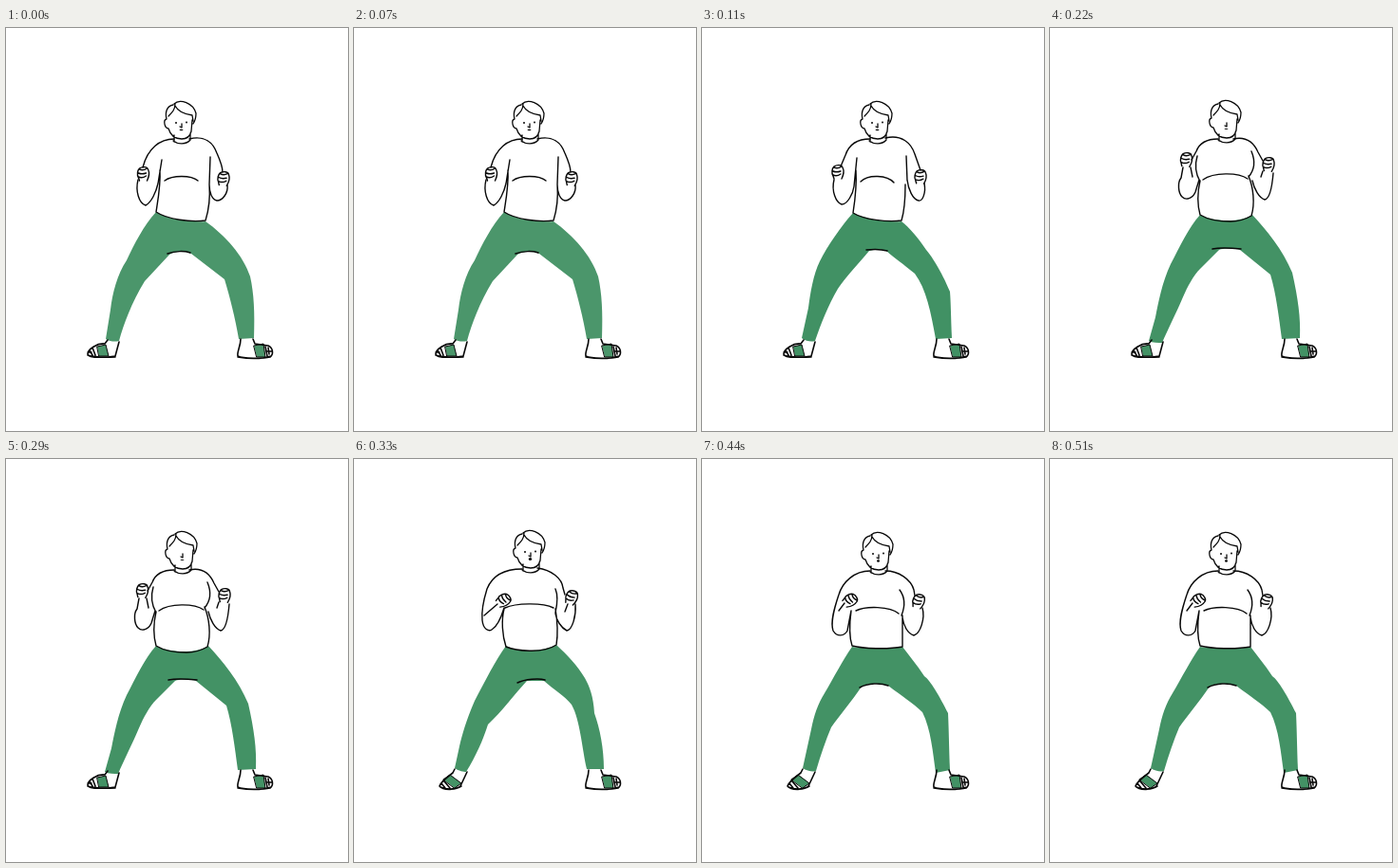
Animation, 360 px wide and 425 px high, one loop 0.55 s. Source, as an HTML page with a canvas:

```html
<!DOCTYPE html>
<html lang="en">
<head>
<meta charset="utf-8">
<title>Dance</title>
<style>
  html, body { margin: 0; width: 100%; height: 100%; overflow: hidden; background: #fff; }
  canvas { display: block; width: 360px; height: 425px; }
</style>
</head>
<body>
<canvas id="stage" width="360" height="425"></canvas>
<script>
const ctx = document.getElementById('stage').getContext('2d');
const STEP = 110, INK = '#080808';

const HEAD = `M169 96C167 88 170 82 176 81M177 80C183 74 197 79 200 90C200 95 199 98 197 101
  M178 80C178 86 175 89 171 93M178 82C181 88 189 91 196 92L197 98
  M169 96C165 97 167 106 171 106C173 113 178 117 185 117C191 117 194 113 195 109L196 97
  M177 113V120M194 111V117M176 119C181 123 190 123 194 118M185 101V105L183 104`;

const FIST = `M-4 7L-5 4C-7 1-6-4-4-6C-1-8 4-8 5-5C7-1 6 3 4 7
  M-4-5C-2-4 1-4 4-6M-5-1C-3 0 0 0 3-1M-5 3C-3 4 0 4 3 2`;

// Each foot: ink outline, then the green strap.
const FLAT_FOOT = {
  ink: `M107 329L104 333C96 332 86 339 86 344C87 349 109 347 115 346L119 331
    M86 345C95 348 106 347 115 347M88 340L91 345M91 337L94 345M86 342L90 342`,
  strap: 'M96 336L105 334L108 346L98 346Z'
};
const TURNED_FOOT = {
  ink: `M106 327L104 331C100 334 91 341 90 345C94 350 108 349 112 345L119 330
    M91 346C97 349 107 349 113 345M92 342L96 347M95 340L101 347`,
  strap: 'M94 338L101 333L113 342L106 347Z'
};
const RIGHT_FOOT = {
  ink: `M247 328C247 336 243 341 244 346C250 349 270 349 278 347C282 344 281 337 276 335L262 333L260 328
    M244 347C256 349 270 349 279 346M273 336L275 346M276 337L277 344M275 341L280 341`,
  strap: 'M261 335L271 333L273 347L264 347Z'
};

// head: offset; fists: x, y, angle; mouth: half width, half height
const POSES = [
  {
    green: '#4b966b', head: [0, 0], mouth: [2, .7], foot: FLAT_FOOT,
    fists: [[144.5, 154, 0], [229, 159, .1]],
    pants: `M158 194C145 208 135 228 127 245C117 260 112 280 110 297L105 328C110 331 115 331 119 330
      C124 312 132 290 146 267L172 239C178 235 188 235 195 238L230 265C236 285 241 305 245 328L261 327
      C262 300 261 280 257 262C250 240 230 218 210 204C195 205 170 202 158 194`,
    body: `M177 117C162 117 149 127 144 147M139 160C136 172 140 185 147 187C153 184 158 173 160 164L164 139
      M162 150C163 165 160 181 158 194C170 202 195 205 210 203C214 190 215 178 214 165L215 136
      M193 117C209 113 218 121 222 132C226 141 228 147 228 152
      M233 166C234 174 228 182 222 182C217 181 214 174 214 165M167 161C175 155 195 155 202 161`,
    crotch: 'M170 238C178 235 188 235 194 237'
  },
  {
    green: '#419164', head: [0, 0], mouth: [2, .7], foot: FLAT_FOOT,
    fists: [[143, 152, 0], [230, 157, .05]],
    pants: `M159 195C147 208 132 230 124 246C117 260 114 280 112 295L105 327C110 331 116 331 119 330
      C125 312 133 292 143 275C152 262 165 248 176 235C182 233 188 233 194 235C203 243 212 249 224 259
      C236 275 241 300 246 328L263 327C262 305 262 290 261 278C252 256 240 238 236 234
      C228 222 218 210 210 204C195 205 172 202 159 195`,
    body: `M177 117C165 117 155 122 151 134L146 146M139 160C136 172 141 184 147 186C153 186 159 175 160 167L163 137
      M162 150C163 165 161 182 159 195C170 202 195 205 210 203C213 193 214 180 214 165M215 135L216 161
      M193 116C210 112 220 121 224 133L230 150M234 164C236 174 232 183 228 182C222 181 217 170 216 160
      M167 162C175 154 195 155 202 163`,
    crotch: 'M173 234C181 233 188 233 195 235'
  },
  {
    green: '#439265', head: [1, -1], mouth: [2, .6], foot: FLAT_FOOT, calm: true,
    fists: [[143.5, 139, .1], [230, 144, .1]],
    pants: `M158 197C146 210 136 232 127 249C118 268 114 290 111 305L104 330C108 332 114 332 118 332
      C124 318 133 300 139 286C145 272 151 261 158 254L178 234C182 232 195 232 200 234L232 260
      C238 280 241 305 244 328L263 327C264 305 261 285 255 258C245 234 228 213 213 197
      C200 206 170 204 158 197`,
    body: `M177 117C165 117 157 122 154 130L149 139M155 135C152 145 154 155 158 162
      M140 147L138 158C134 163 135 174 139 178C143 182 150 180 153 173L157 160M148 147L150 157
      M158 161C155 174 155 186 158 197C166 202 180 204 190 204C200 204 207 201 212 198C216 185 214 168 209 156
      M193 117C207 114 215 122 219 131L224 140M212 130C217 142 215 150 209 157
      M235 153C234 165 232 180 226 181C220 179 215 170 213 161M224 151L222 157
      M161 160C172 152 198 152 208 159`,
    crotch: 'M171 233C180 231 192 232 201 233'
  },
  {
    green: '#459366', head: [1, -2], mouth: [1.7, 1.5], foot: TURNED_FOOT,
    fists: [[157.5, 149, 1], [229, 146, .35]],
    pants: `M160 197C149 212 138 234 127 255C118 276 114 290 111 303L106 326C110 329 116 330 118 330
      C128 314 136 296 141 280C155 267 170 247 182 234L200 234C210 243 222 250 229 259
      C238 275 240 305 245 327L263 327C263 305 259 285 253 268C252 250 248 240 243 231
      C235 218 225 207 213 196C195 205 170 203 160 197`,
    body: `M177 116C160 116 146 122 140 137C136 150 134 160 135 170C136 180 142 182 145 180C150 177 155 167 158 157
      M151 153L137 165M158 158C155 170 156 186 160 198C170 202 198 206 213 196C215 183 214 170 212 158
      M193 115C208 117 219 126 220 136L222 143M212 137C215 144 214 153 212 162
      M233 153C234 165 230 180 224 181C218 178 213 170 212 163M225 153L222 161
      M159 157C170 152 198 151 210 157`,
    crotch: 'M172 236C180 232 195 231 201 233'
  },
  {
    green: '#439265', head: [1, 0], mouth: [1.5, 1.3], foot: TURNED_FOOT,
    fists: [[156, 149, 1], [228, 150, .3]],
    pants: `M158 198C148 212 138 232 129 247C122 258 118 270 115 285L106 326C110 329 117 330 120 329
      C125 312 130 297 136 283C145 270 158 255 168 240C175 236 188 236 196 239C210 250 222 257 232 267
      C241 285 243 310 246 331L261 328C260 305 260 290 259 268C250 250 240 233 234 229
      C226 217 218 207 211 198C195 201 170 200 158 198`,
    body: `M177 118C160 118 148 130 144 143C139 158 135 172 138 181C142 188 150 187 153 181L157 160
      M150 152L144 160M157 160C155 175 155 188 158 197C170 200 195 201 211 198L211 165
      M208 138C214 146 214 155 210 165M193 118C207 118 220 127 223 138L224 144
      M232 157C235 168 230 184 223 186C216 184 212 175 211 167
      M162 160C172 155 198 155 207 163`,
    crotch: 'M166 241C175 236 188 236 196 239'
  }
];

function stroke(path, width = 1.4) {
  ctx.lineWidth = width;
  ctx.stroke(new Path2D(path));
}

function fill(path, color) {
  ctx.fillStyle = color;
  ctx.fill(new Path2D(path));
}

function placed(x, y, angle, paint) {
  ctx.save();
  ctx.translate(x, y);
  ctx.rotate(angle);
  paint();
  ctx.restore();
}

function dot(x, y, rx, ry = rx) {
  ctx.beginPath();
  ctx.ellipse(x, y, rx, ry, 0, 0, Math.PI * 2);
  ctx.fill();
}

function drawFoot({ ink, strap }, green) {
  fill(strap, green);
  stroke(strap, 1);
  stroke(ink, 1.6);
}

function drawHead({ mouth, calm }) {
  stroke(HEAD, 1.3);
  ctx.fillStyle = INK;
  if (!calm) {
    dot(179, 100, 1);
    dot(190, 99.5, 1);
  }
  dot(184.5, 107.5, ...mouth);
}

function draw(pose) {
  ctx.clearRect(0, 0, 360, 425);
  ctx.strokeStyle = INK;
  ctx.lineCap = ctx.lineJoin = 'round';
  fill(pose.pants, pose.green);
  stroke(pose.crotch, 1.5);
  drawFoot(pose.foot, pose.green);
  drawFoot(RIGHT_FOOT, pose.green);
  stroke(pose.body);
  pose.fists.forEach(([x, y, angle]) => placed(x, y, angle, () => stroke(FIST)));
  placed(...pose.head, 0, () => drawHead(pose));
}

const start = performance.now();
function tick() {
  const elapsed = performance.now() - start;
  draw(POSES[Math.floor(elapsed / STEP) % POSES.length]);
  requestAnimationFrame(tick);
}
tick();
</script>
</body>
</html>
```
